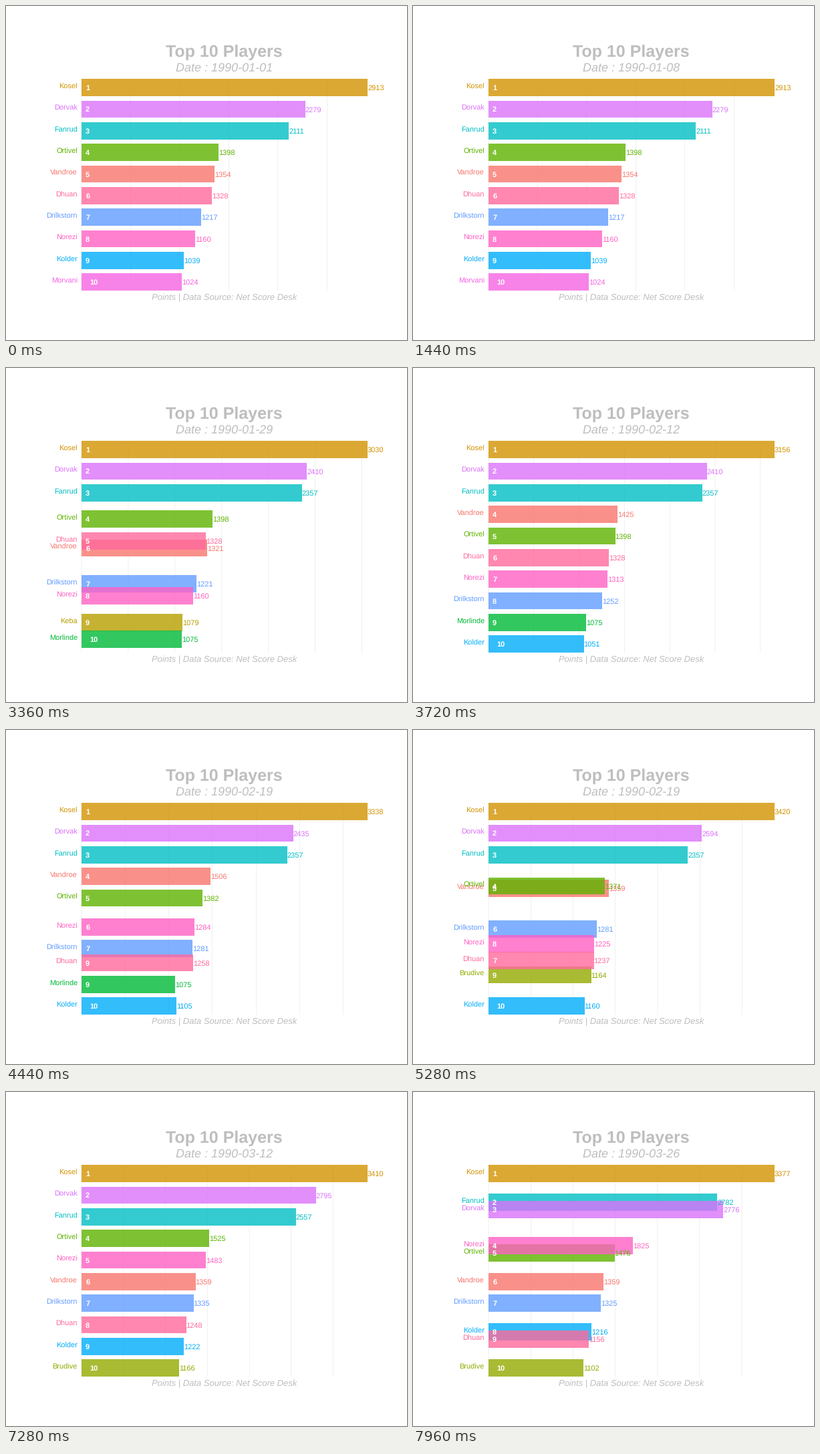
Write a matplotlib script that moves like this. It is 600x500 px and loops after 8000 ms.

```python
import matplotlib.pyplot as plt
from matplotlib.animation import FuncAnimation
from matplotlib.patches import Rectangle

plt.rcParams["font.family"] = "Liberation Sans"
plt.rcParams["text.hinting"] = "none"

W, H, DPI = 600, 500, 100
FRAMES, STEP = 200, 40
LEFT, RIGHT = 113, 541                  # bar area, px
TOP, PITCH, BAR = 109.2, 32.34, 25.9    # first bar, row spacing, bar height
TWEEN = 9                               # frames per transition
STARTS = [14, 37, 59, 82, 105, 127, 149, 171, 193]
GREY = "#bebebe"

# Listed in drawing order.
COLORS = dict(
    Vandroe="#F8766D", Kosel="#D39200", Keba="#B79F00", Brudive="#93AA00",
    Ortivel="#5EB300", Morlinde="#00BA38", Fanrud="#00BFC4", Kolder="#00ADFA",
    Drilkstorn="#619CFF", Dorvak="#DB72FB", Morvani="#F564E3",
    Norezi="#FF61C3", Dhuan="#FF699C")

# Each table is in rank order.
OPENING = dict(Kosel=2913, Dorvak=2279, Fanrud=2111, Ortivel=1398, Vandroe=1354,
               Dhuan=1328, Drilkstorn=1217, Norezi=1160, Kolder=1039, Morvani=1024)
STATES = [
    ("1990-01-01", OPENING),
    ("1990-01-08", OPENING),
    ("1990-01-15", {**OPENING, "Dorvak": 2320, "Drilkstorn": 1227}),
    ("1990-01-29", dict(Kosel=3030, Dorvak=2410, Fanrud=2357, Ortivel=1398, Dhuan=1328,
                        Vandroe=1321, Drilkstorn=1221, Norezi=1160, Keba=1079, Morlinde=1075)),
    ("1990-02-12", dict(Kosel=3156, Dorvak=2410, Fanrud=2357, Vandroe=1425, Ortivel=1398,
                        Dhuan=1328, Norezi=1313, Drilkstorn=1252, Morlinde=1075, Kolder=1051)),
    ("1990-02-19", dict(Kosel=3338, Dorvak=2435, Fanrud=2357, Vandroe=1506, Ortivel=1382,
                        Norezi=1284, Drilkstorn=1281, Brudive=1276, Dhuan=1258, Kolder=1105)),
    ("1990-02-26", dict(Kosel=3420, Dorvak=2594, Fanrud=2357, Ortivel=1371, Vandroe=1359,
                        Drilkstorn=1281, Dhuan=1237, Norezi=1225, Brudive=1164, Kolder=1160)),
    ("1990-03-05", dict(Kosel=3420, Dorvak=2594, Fanrud=2357, Ortivel=1510, Vandroe=1359,
                        Drilkstorn=1281, Dhuan=1237, Norezi=1225, Brudive=1164, Kolder=1160)),
    ("1990-03-12", dict(Kosel=3410, Dorvak=2795, Fanrud=2557, Ortivel=1525, Norezi=1483,
                        Vandroe=1359, Drilkstorn=1335, Dhuan=1248, Kolder=1222, Brudive=1166)),
    ("1990-03-26", dict(Kosel=3377, Fanrud=2782, Dorvak=2776, Norezi=1825, Ortivel=1476,
                        Vandroe=1359, Drilkstorn=1325, Kolder=1216, Dhuan=1156, Brudive=1102)),
]

fig = plt.figure(figsize=(W / DPI, H / DPI), dpi=DPI, facecolor="white")
ax = fig.add_axes([0, 0, 1, 1])
ax.set_xlim(0, W)
ax.set_ylim(H, 0)
ax.axis("off")


def label(x, y, text, px, color=GREY, **kw):
    return ax.text(x, y, text, fontsize=px * 72 / DPI, color=color, va="baseline", **kw)


class Row:
    def __init__(self, name, color):
        self.bar = ax.add_patch(Rectangle((LEFT, 0), 1, BAR, facecolor=color, alpha=0.8,
                                          linewidth=0, antialiased=False, zorder=2))
        self.name = label(LEFT - 6.1, 0, name, 11, color, ha="right", zorder=3)
        self.value = label(0, 0, "", 11, color, zorder=4)
        self.rank = label(0, 0, "", 11, "white", weight="bold", zorder=5)
        self.parts = (self.bar, self.name, self.value, self.rank)

    def show(self, on):
        for part in self.parts:
            part.set_visible(on)

    def place(self, pos, value, scale, rank, points):
        y = TOP + PITCH * (pos - 1)
        mid = y + BAR / 2
        self.bar.set_y(y)
        self.bar.set_width(value * scale)
        self.name.set_y(mid + 1.8)
        self.value.set_position((LEFT + value * scale, mid + 4))
        self.value.set_text(str(points))
        self.rank.set_position((LEFT + (12.2 if rank > 9 else 6.1), mid + 4))
        self.rank.set_text(str(rank))


label(326.5, 76, "Top 10 Players", 25, weight="bold", ha="center")
subtitle = label(326.5, 98, "", 18, style="italic", ha="center")
label(327, 440.3, "Points | Data Source: Net Score Desk", 13, style="italic", ha="center")
grid = [ax.plot([LEFT, LEFT], [TOP, TOP + 9 * PITCH + BAR], color=GREY, lw=0.22 * 72 / DPI,
                snap=False, solid_capstyle="butt", zorder=1)[0] for _ in range(7)]
rows = {name: Row(name, color) for name, color in COLORS.items()}


def locate(frame):
    """Current state index and the step within its transition."""
    i, k = 0, 0
    for n, start in enumerate(STARTS):
        if frame >= start + TWEEN:
            i, k = n + 1, 0
        elif frame > start:
            i, k = n, frame - start
    return i, k


def ranked(table):
    return {name: (n, points) for n, (name, points) in enumerate(table.items(), 1)}


def draw(frame):
    i, k = locate(frame)
    j = min(i + 1, len(STATES) - 1)
    t = k / TWEEN
    now, then = ranked(STATES[i][1]), ranked(STATES[j][1])
    subtitle.set_text("Date : " + STATES[j if k > 5 else i][0])

    # Leaving rows stay put until the transition ends; new ones appear then.
    tween = {}
    for name, a in now.items():
        b = then.get(name, a)
        tween[name] = [p + (q - p) * t for p, q in zip(a, b)] + list(b if t >= 0.5 else a)
    top = max(v[1] for v in tween.values())
    scale = (RIGHT - LEFT) / top

    for n, line in enumerate(grid):
        x = LEFT + 500 * n * scale
        line.set_xdata([x, x])
        line.set_visible(500 * n <= top)
    for name, row in rows.items():
        row.show(name in tween)
        if name in tween:
            pos, value, rank, points = tween[name]
            row.place(pos, value, scale, rank, points)
    return []


anim = FuncAnimation(fig, draw, frames=FRAMES, interval=STEP, repeat=True,
                     repeat_delay=0, init_func=lambda: draw(0))
plt.show()
```
